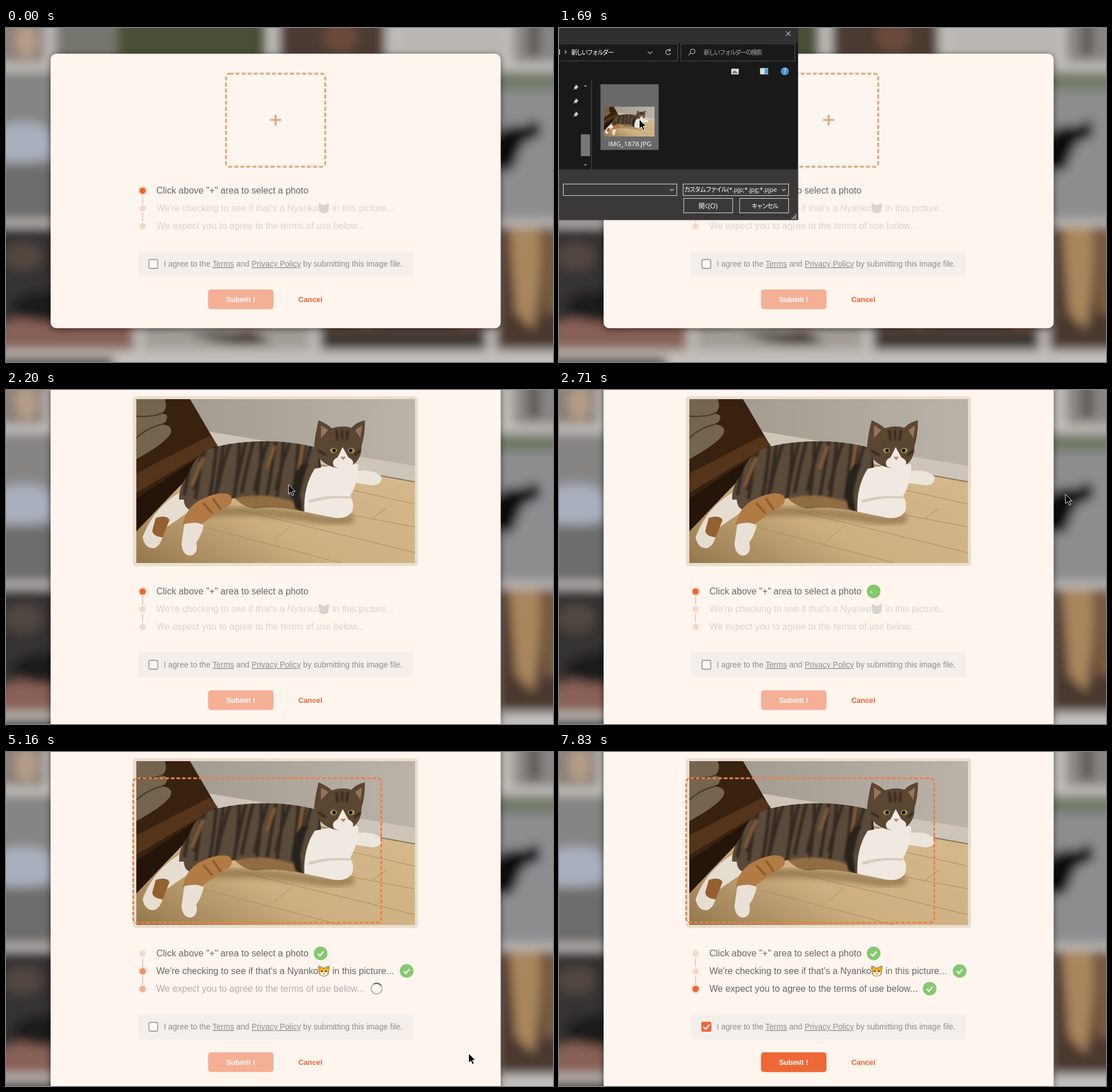
Recreate the animation shown at these times as an HTML page. Size 957 by 585 pixels, loop 9090 ms.

```html
<!DOCTYPE html>
<html lang="en">
<head>
<meta charset="utf-8">
<title>Photo upload</title>
<style>
html, body { margin: 0; width: 100%; height: 100%; overflow: hidden; background: #999; }
svg { display: block; width: 100vw; height: 100vh; font-family: "Liberation Sans", Arial, sans-serif; }
#dialog { font: 12px "Open Sans", "Noto Sans", sans-serif; fill: #fff; }
#dialog .ja { font: 11px "Noto Sans CJK JP", "Noto Sans CJK", sans-serif; letter-spacing: -1.9px; }
#dialog .line { fill: none; stroke: #ddd; stroke-width: 1; }
.step { font-size: 16px; fill: #6b6663; }
.bold { font-size: 12.8px; font-weight: bold; }
.modal { filter: drop-shadow(0 2px 6px rgba(0,0,0,.55)); }
</style>
</head>
<body>
<svg viewBox="0 0 957 585" preserveAspectRatio="none">
<defs>
  <filter id="blur" filterUnits="userSpaceOnUse" x="-40" y="-40" width="1040" height="670"><feGaussianBlur stdDeviation="9"/></filter>
  <filter id="soft" x="-10%" y="-60%" width="120%" height="220%"><feGaussianBlur stdDeviation="5"/></filter>
  <filter id="fur"><feGaussianBlur stdDeviation="1.600"/></filter>
  <linearGradient id="floor" x1="0" y1="1" x2="1" y2="0"><stop offset="0" stop-color="#94774c"/><stop offset=".35" stop-color="#ceb080"/><stop offset="1" stop-color="#d8bd93"/></linearGradient>
  <linearGradient id="wall"><stop offset="0" stop-color="#a39c91"/><stop offset="1" stop-color="#bab3a9"/></linearGradient>
  <clipPath id="photoClip"><path d="M228 16h487.5v287H228z"/></clipPath>
  <clipPath id="coat"><use href="#body"/></clipPath>
  <clipPath id="types"><path d="M216 272h166v20h-166z"/></clipPath>
  <path id="face" d="M547 307q4 0 6 3h6q2-3 6-3 1 5-1 8 2 9-8 9.500-10-.5-8-9.500-2-3-1-8z"/>
</defs>

<g id="wallpaper" filter="url(#blur)">
  <path fill="#c3bfbb" d="M-40-40h1040v670H-40z"/>
  <path fill="#8b8079" d="M-30-30h98v90h-98z"/><ellipse cx="36" cy="22" rx="20" ry="30" fill="#b59d86"/>
  <path fill="#77766e" d="M86-30h130v90H86z"/><path fill="#485036" d="M195-30h260v90H195z"/>
  <path fill="#4c3a33" d="M478-30h186v88H478z"/><ellipse cx="585" cy="15" rx="30" ry="28" fill="#6b4c3a"/>
  <path fill="#bcb7b2" d="M682-30h196v86H682z"/><path fill="#888582" d="M888-30h100v90H888z"/><path fill="#57504c" d="M915-30h18v80h-18z"/>
  <path fill="#868584" d="M-30 76h292v260H-30z"/><path fill="#6d6c6c" d="M-30 240h290v96H-30z"/>
  <path fill="#a9afbc" d="M-30 180Q40 150 80 180L85 225Q20 245-30 225z"/>
  <path fill="#67655f" d="M278 76h326v260H278z"/><circle cx="362" cy="103" r="28" fill="#aaa032"/>
  <ellipse cx="455" cy="112" rx="38" ry="15" fill="#b4505f"/><ellipse cx="562" cy="125" rx="42" ry="17" fill="#b9689c"/><ellipse cx="560" cy="92" rx="45" ry="12" fill="#98938a"/>
  <path fill="#8d8d90" d="M612 76h380v260H612z"/><path fill="#6f7966" d="M612 76h380v32H612z"/>
  <path fill="#0f0e10" d="M840 200Q870 165 905 172L930 160 936 188 905 202 885 250 840 250z"/>
  <path fill="#353030" d="M-30 348h254v216H-30z"/><path fill="#886056" d="M40 505q80 0 125-60h59v119H-30v-40z"/>
  <ellipse cx="82" cy="488" rx="72" ry="28" fill="#1d1a1b"/><ellipse cx="30" cy="400" rx="34" ry="26" fill="#514740"/>
  <path fill="#a39d96" d="M240 348h292v216H240z"/><ellipse cx="330" cy="480" rx="55" ry="44" fill="#d4d1cd"/>
  <ellipse cx="425" cy="480" rx="48" ry="42" fill="#b7783a"/><ellipse cx="400" cy="450" rx="32" ry="18" fill="#50392b"/><path fill="#302521" d="M310 525q60 15 120 5l35 20q-90 15-155-25z"/>
  <path fill="#5f4a3c" d="M550 348h290v216H550z"/><ellipse cx="630" cy="480" rx="45" ry="38" fill="#a5886c"/>
  <ellipse cx="755" cy="470" rx="24" ry="32" fill="#c28147"/><ellipse cx="810" cy="503" rx="32" ry="16" fill="#c16c77"/><path fill="#36302d" d="M550 535h290v28H550z"/>
  <path fill="#4b382d" d="M858 348h130v216H858z"/><path fill="#a9865d" d="M880 348h54q6 90-12 180l-30-30z"/><path fill="#7a5b40" d="M940 350h40v150h-40z"/>
  <path fill="#302d2c" d="M-30 578h218v40H-30z"/>
</g>

<rect id="modal" class="modal" x="78" width="787.500" rx="10" fill="#fff5ef"/>

<g id="drop" fill="none" stroke="#d9ae82" stroke-width="3.5">
  <rect x="385" y="80" width="173.500" height="163" rx="6" stroke-dasharray="7 3.6"/>
  <path d="M462 161h19.500M471.700 152v19"/>
</g>

<g id="preview">
  <rect x="222" y="11" width="499" height="297.500" rx="6" fill="#eadfcf"/>
  <g id="photo" clip-path="url(#photoClip)">
    <path fill="url(#floor)" d="M228 16h488v288H228z"/>
    <path d="M716 200L560 165M716 240L480 195M716 285L400 208M590 304L345 240M400 304L270 260M585 190l25-20M470 262l30-25M640 225l25-18" stroke="#a98b5f" fill="none"/>
    <path fill="url(#wall)" d="M320 16H716V133L352 72z"/>
    <path fill="#cdc5b9" d="M350 72L716 133V160L368 98z"/>
    <path d="M365 98L716 161" stroke="#8a765a" stroke-width="2"/>
    <path fill="#38210f" d="M228 16h94l48 82-142 150z"/>
    <path fill="#54341a" d="M228 146l128-66 14 16-142 84z"/>
    <path fill="#24140a" d="M228 190L362 102l-34 42L228 246z"/>
    <path fill="#75654f" d="M228 16h50q6 20-8 26 18-2 9 14l-8 4q24 2 16 18-10 16-59 43z"/>
    <path d="M228 46q30 2 46-6M228 84q20-18 45-24" stroke="#4b3d2d" stroke-width="2.500" fill="none"/>
    <path d="M330 215q90-8 200 8 50 10 78 0" stroke="#6e5531" stroke-width="16" fill="none" opacity=".5" filter="url(#soft)"/>
    <path fill="#e6ddd1" d="M303 180q-46 28-64 78 4 20 20 19 14-4 18-34l52-36z"/>
    <path fill="#95602f" d="M262 224q20-6 24 4l-12 30q-18-2-18-12z"/>
    <path id="body" fill="#5a4a39" d="M303 192Q302 168 318 150 330 116 352 105 385 92 440 90q55-2 108 12l4 45q-28 24-29 66-50-10-83-6-20 2-40-18l-70 22q-18 0-19-19z"/>
    <g clip-path="url(#coat)"><g filter="url(#fur)">
      <path id="stripes" fill="none" stroke="#2d251e" stroke-width="6" opacity=".85"/>
      <path d="M345 118l-20 50M470 98l-14 40M520 95l-8 45" stroke="#7e5836" stroke-width="6"/>
      <path fill="#a17547" opacity=".8" d="M388 194q60-22 130 8l6 14q-70-14-105-8z"/>
      <path fill="#27201a" d="M530 130q-26 40-8 86l-16-8q-12-40 10-78z"/>
    </g></g>
    <path fill="#b27b45" d="M392 184q10 15-12 24l-45 32-26-3q5-30 30-44 35-18 53-9z"/>
    <path d="M345 198l16 18M362 190l14 20" stroke="#8f5d2e" stroke-width="4"/>
    <path fill="#e9e1d7" d="M312 235q22-6 34 2-4 18-13 30 4 20-10 23-14 0-16-20z"/>
    <path fill="#ece5dc" d="M612 142q32-4 45 10 2 14-16 15l-36-5z"/>
    <path fill="#efe9e2" d="M540 138q40-10 76-8 2 28-14 56 8 10 4 26-10 16-36 11l-48-10q-2-44 18-75z"/>
    <path d="M530 196q35-12 72-8" stroke="#c2b6a7" stroke-width="3" fill="none" filter="url(#fur)"/>
    <path fill="#5b4632" d="M539 98q2-22 8-45 14 6 23 14 18-6 34-1 10-10 24-13 0 26-6 45 0 34-32 39-42 0-51-39z"/>
    <path fill="#94745f" d="M551 62l13 8-13 14zM623 62l-12 8 9 14z"/>
    <path d="M578 70l2 18M588 69v18M598 70l-2 18M546 106l14 8M620 106l-10 8" stroke="#291e17" stroke-width="3" filter="url(#fur)"/>
    <path fill="#efe9e2" d="M589 100l10 18q12 6 7 14-14 10-32 2-6-10 6-16z"/>
    <path fill="#bd8277" d="M585 117h10l-5 6z"/>
    <ellipse cx="573" cy="106" rx="6" ry="4.500" fill="#a8954a"/><ellipse cx="604" cy="106" rx="6" ry="4.500" fill="#a8954a"/>
    <circle cx="574" cy="106" r="3"/><circle cx="603" cy="106" r="3"/>
  </g>
</g>
<rect id="found" x="-217" y="-126.500" width="434" height="253" rx="7" fill="none" stroke="#ed8049" stroke-width="3" stroke-dasharray="6.5 3.3"/>

<g id="form">
  <path d="M239 293v15M239 324v15" stroke="#e3cfc5" stroke-width="2"/>
  <g id="dots"></g>
  <text class="step" x="263" y="290">Click above "+" area to select a photo</text>
  <g id="row1">
    <text class="step" x="263" y="321">We're checking to see if that's a Nyanko</text>
    <text class="step" x="571" y="321">in this picture...</text>
  </g>
  <use href="#face" fill="#d9d4d0"/>
  <g id="faceLit">
    <use href="#face" fill="#fcb82c" stroke="#5e4426" stroke-width=".8"/>
    <path fill="#fff6e6" d="M549 319q7-4 14 0-1 5-7 5t-7-5z"/>
    <path d="M549 309l2 4M563 309l-2 4M556 310v3" stroke="#e8873a" stroke-width="1.500"/>
    <circle cx="552.500" cy="316" r="1.400" fill="#333"/><circle cx="559.500" cy="316" r="1.400" fill="#333"/>
    <path d="M554 320q2 2 4 0" stroke="#6b4a35" fill="none"/>
  </g>
  <text id="row2" class="step" x="263" y="352">We expect you to agree to the terms of use below...</text>
  <g id="ticks"></g>
  <rect x="231" y="391" width="481" height="45" rx="5" fill="#f4efeb"/>
  <rect x="250" y="405.500" width="15.500" height="15.500" rx="2.500" fill="#fff9f5" stroke="#a7a29f" stroke-width="1.800"/>
  <g id="checked"><rect x="249" y="404.500" width="17.500" height="17.500" rx="3" fill="#ed6836"/><path d="M252.500 413.500l4 4 7-8" fill="none" stroke="#fff" stroke-width="2.400"/></g>
  <text x="276" y="418" font-size="13.850" fill="#928d8a">I agree to the <tspan text-decoration="underline">Terms</tspan> and <tspan text-decoration="underline">Privacy Policy</tspan> by submitting this image file.</text>
  <rect x="353.500" y="458" width="114.500" height="34.500" rx="5" fill="#f5af95"/>
  <rect id="ready" x="353.500" y="458" width="114.500" height="34.500" rx="5" fill="#ed6836"/>
  <text class="bold" x="385" y="479.500" fill="#fff">Submit !</text>
  <text class="bold" x="511.500" y="479.500" fill="#e5622f">Cancel</text>
</g>

<g id="dialog">
  <path fill="#191919" d="M-160-10h576v345h-576z"/>
  <path fill="#303030" d="M-160-10h576v37h-576z"/>
  <path fill="#3b3838" d="M-160 247h576v88h-576z"/>
  <path class="line" stroke-opacity=".3" d="M-20 28.500h227v30H-20M212.500 28.500h198v30h-198zM57.500 92v155"/>
  <path class="line" d="M395 7l8 8m0-8l-8 8M155 42l4 4 4-4M11 40l3 3-3 3M194 40a4.500 4.500 0 1 0 1 5M194 37v4h-4M229 45l-3 4M45 103l2-2 2 2M45 238l2 2 2-2M194 281l3 3 3-3M388 281l3 3 3-3"/>
  <circle class="line" cx="233" cy="42" r="4"/>
  <text x="-4" y="48">d</text><text class="ja" x="22" y="47.500">新しいフォルダー</text>
  <text class="ja" x="252" y="47.500" opacity=".6">新しいフォルダーの検索</text>
  <path fill="#ddd" d="M300 72h13v10h-13zM350 71h14v11h-14z"/><path fill="#4b9bd8" d="M358 72h6v9h-6z"/><path fill="#777" d="M302 78l4-3 6 5h-10z"/>
  <circle cx="393" cy="76.500" r="7" fill="#3f92d6"/><text x="390.500" y="81">?</text>
  <path id="pin" fill="#ccc" d="M30 99l5 5-2 1-2 3-2-1-4 3 3-4-1-2 3-2z"/><use href="#pin" y="24"/><use href="#pin" y="47"/>
  <path fill="#777" d="M39 186h16v38H39z"/>
  <path id="picked" fill="#fff" fill-opacity=".35" d="M73 99h101v114H73z"/>
  <use href="#photo" transform="translate(79 138) scale(.1805) translate(-228 -16)"/>
  <text x="124" y="207" text-anchor="middle" font-size="11.500">IMG_1878.JPG</text>
  <path class="line" d="M8.500 272.500h197v20H8.500zM216.500 272.500h183v20h-183zM217.500 297.500h85v25h-85zM314.500 297.500h85v25h-85z"/>
  <text x="-1" y="286">:</text><text id="fileName" x="11" y="286.500" font-size="11.500">IMG_1878.JPG</text>
  <g clip-path="url(#types)"><text class="ja" x="218" y="286.500">カスタム ファイル</text><text x="293" y="286.500" font-size="10.500">(*.pjp;*.jpg;*.pjpe</text></g>
  <text class="ja" x="243" y="314.500">開く</text><text x="260" y="314.500">(O)</text>
  <text class="ja" x="335" y="314.500">キャンセル</text>
  <path fill="#ccc" d="M411 331h2v2h-2zM408 331h2v2h-2zM405 331h2v2h-2zM411 328h2v2h-2zM408 328h2v2h-2zM411 325h2v2h-2z"/>
</g>

<g id="pointer" stroke="#fff" stroke-width=".9">
  <path id="arrow" fill="#000" d="M0 0v16.500l3.800-3.600 2.700 6.200 2.700-1.200-2.700-6h5.200z"/>
  <path id="hand" fill="#fff" stroke="#333" d="M-1.500 1q1.500-2 3 0v6l6 1.500q2 .8 1.500 3l-1.500 6h-7l-5-6.500q0-2 3-.5z"/>
</g>
</svg>
<script>
const LOOP = 9090;
const $ = id => document.getElementById(id);
const set = (el, attrs) => { for (const k in attrs) el.setAttribute(k, attrs[k]); };
const fade = (id, value) => set($(id), { opacity: value });
const ramp = (t, a, b) => Math.min(1, Math.max(0, (t - a) / (b - a)));
const ease = (t, a, b) => { const u = ramp(t, a, b); return u * u * (3 - 2 * u); };
const mix = (a, b, u) => a + (b - a) * u;

// Each pointer run is a list of [time, x, y] stops; the pointer is hidden between runs.
const runs = [
  [[60, 709, 426], [180, 763, 221], [540, 763, 221], [1000, 482, 166], [1200, 474, 164], [1390, 371.5, 185.5],
   [1700, 140, 160], [1900, 166, 150], [2060, 171.5, 149], [2350, 845, 184], [2710, 886, 182.5], [3030, 927, 186]],
  [[4380, 919, 528], [4780, 816, 530], [5040, 816, 530], [5920, 690, 490], [6370, 671, 486], [6520, 671, 486], [6800, 915, 530]],
  [[7800, 955, 573], [7830, 955, 573]]
];

const marks = [
  { x: 550.5, y: 284.7, wait: 2380, ring: [2380, 2560], fill: [2480, 2670], tick: [2655, 2850], pulse: [2830, 3030] },
  { x: 701, y: 315.5, wait: 3450, ring: [3700, 4230], fill: [4370, 4520], tick: [4470, 4680], pulse: [4560, 4780] },
  { x: 648.5, y: 346.5, wait: 5150, ring: [6480, 6680], fill: [6600, 6780], tick: [6700, 6870], pulse: [7010, 7380] }
];
const steps = [0, 3330, 5040];
const RADIUS = 11.8;

$("ticks").innerHTML = marks.map((m, i) => `<g id="mark${i}" fill="none">
  <g id="wait${i}"><circle r="9.500" stroke="#aaa5a0" stroke-width="1.600"/><path d="M9.500 0A9.500 9.500 0 0 1 0 9.500" stroke="#5f5854" stroke-width="2"/></g>
  <circle id="ring${i}" r="10.400" stroke="#84c96e" stroke-width="2.800" pathLength="100"/>
  <circle id="fill${i}" stroke="#84c96e"/>
  <path id="tick${i}" d="M-5 .5l3.500 3.800 6.500-7.500" stroke="#fff" stroke-width="2.500" pathLength="100"/></g>`).join("");

$("dots").innerHTML = steps.map((s, i) => { const at = `cx="239" cy="${285 + 31 * i}"`; return `
  <circle ${at} r="5.500" fill="#f4d8c9"/>
  <g id="dot${i}"><circle ${at} r="8" fill="#f4dccb"/><circle ${at} r="5.500" fill="#ef6533"/></g>`; }).join("");

let stripes = "";
for (let i = 0; i < 19; i++) {
  const bend = 9 * Math.sin(i * 2.3);
  stripes += `M${330 + i * 13} 84q${-8 + bend} 45 ${-18 + bend} ${100 + bend}`;
}
set($("stripes"), { d: stripes });

function drawMark(m, i, t) {
  const width = RADIUS * ease(t, ...m.fill);
  const scale = 1 + .17 * Math.sin(Math.PI * ramp(t, ...m.pulse));
  const stroke = (id, u) => set($(id + i), { "stroke-dasharray": `${100 * u} 200`, opacity: u > 0 ? 1 : 0 });
  set($("mark" + i), { transform: `translate(${m.x} ${m.y}) scale(${scale})` });
  set($("wait" + i), { opacity: t >= m.wait && t < m.ring[0] ? 1 : 0, transform: `rotate(${(t - 6370) * .4})` });
  stroke("ring", ease(t, ...m.ring));
  stroke("tick", ease(t, ...m.tick));
  set($("fill" + i), { r: RADIUS - width / 2, "stroke-width": width });
}

function drawPointer(t) {
  const run = runs.find(r => t >= r[0][0] && t < r[r.length - 1][0]);
  fade("pointer", run ? 1 : 0);
  if (!run) return;
  const k = run.findIndex(p => p[0] > t), a = run[k - 1], b = run[k], u = ease(t, a[0], b[0]);
  const x = mix(a[1], b[1], u), y = mix(a[2], b[2], u);
  const overDrop = t < 1290 && x > 384 && x < 560 && y > 79 && y < 244;
  const overLabel = t > 4380 && x > 231 && x < 712 && y > 459 && y < 504;
  set($("pointer"), { transform: `translate(${x} ${y})` });
  fade("hand", overDrop || overLabel ? 1 : 0);
  fade("arrow", overDrop || overLabel ? 0 : 1);
}

function render(t) {
  const empty = t < 2030, loaded = t >= 2200;
  const shift = empty ? 0 : loaded ? 68 : -83;
  const top = empty ? 45 : loaded ? -23 : 128;
  set($("modal"), { y: top, height: 525.7 + shift - top });
  set($("form"), { transform: `translate(0 ${shift})` });
  fade("drop", empty ? 1 : 0);
  fade("preview", loaded ? 1 : 0);

  const opening = ramp(t, 1300, 1465), closing = ramp(t, 1975, 2077);
  const zoom = 1.008 - .1 * (1 - opening) ** 3 - .035 * closing;
  set($("dialog"), { opacity: opening * (1 - closing), transform: `translate(130 165) scale(${zoom}) translate(-130 -165)` });
  fade("picked", t < 1680 ? 0 : 1);
  fade("fileName", t < 1780 ? 0 : 1);

  steps.forEach((start, i) => {
    const on = i ? ease(t, start, start + 300) : 1;
    const off = i < 2 ? ease(t, steps[i + 1], steps[i + 1] + 300) : 0;
    fade("dot" + i, on * (1 - off));
    if (i) fade("row" + i, mix(.23, 1, on));
    if (i === 1) fade("faceLit", on);
  });
  marks.forEach((m, i) => drawMark(m, i, t));

  const v = ramp(t, 3756, 4230) - 1;
  set($("found"), { opacity: Math.min(1, (v + 1) * 5), transform: `translate(439.5 172.5) scale(${1 + 2.33 * v ** 3 + 1.33 * v * v})` });

  fade("checked", ease(t, 6480, 6580));
  fade("ready", ease(t, 6480, 6700));
  drawPointer(t);
}

const begin = performance.now();
function frame() {
  render((performance.now() - begin) % LOOP);
  requestAnimationFrame(frame);
}
frame();
</script>
</body>
</html>
```
